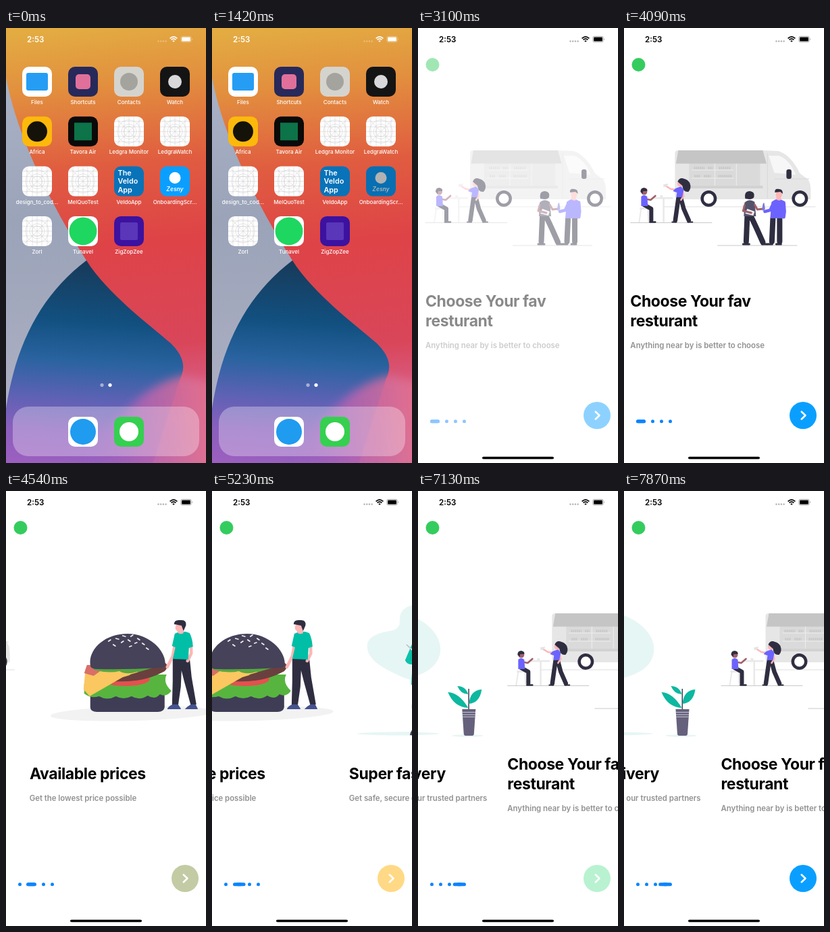
An HTML page for the animation above (7.99 s loop, 296x640 px).

```html
<!DOCTYPE html>
<html lang="en">
<head>
<meta charset="utf-8">
<title>Onboarding</title>
<style>
  html, body { margin: 0; width: 100%; height: 100%; overflow: hidden; background: #fff; }
  svg { display: block; width: 100vw; height: 100vh; font-family: Inter, Roboto, sans-serif; }
  .title { font-size: 23px; font-weight: 700; letter-spacing: -.42px; }
  .sub { font-size: 11.4px; font-weight: 600; letter-spacing: -.02px; fill: #929292; }
  .label { font-size: 8px; font-weight: 500; fill: #fff; text-anchor: middle; }
  .tile { font-weight: 600; fill: #fff; }
  .limb path { fill: none; stroke-linecap: round; stroke-linejoin: round; }
</style>
</head>
<body>
<svg viewBox="0 0 296 640" preserveAspectRatio="none">
  <defs>
    <linearGradient id="warm" gradientUnits="userSpaceOnUse" x1="110" y1="0" x2="170" y2="640">
      <stop offset="0" stop-color="#e3ab42"/><stop offset=".13" stop-color="#e2903e"/>
      <stop offset=".32" stop-color="#e05c40"/><stop offset=".5" stop-color="#de4347"/>
      <stop offset=".74" stop-color="#d9465a"/><stop offset=".87" stop-color="#d8608a"/>
      <stop offset="1" stop-color="#de7ba4"/>
    </linearGradient>
    <linearGradient id="grey" x1="0" y1="0" x2="0" y2="1">
      <stop offset="0" stop-color="#a9b2c6"/><stop offset=".4" stop-color="#9aa3b8"/><stop offset="1" stop-color="#b0b1c4"/>
    </linearGradient>
    <linearGradient id="deep" gradientUnits="userSpaceOnUse" x1="130" y1="343" x2="110" y2="640">
      <stop offset="0" stop-color="#173a59"/><stop offset=".3" stop-color="#125080"/>
      <stop offset=".5" stop-color="#2a63a0"/><stop offset=".68" stop-color="#5c62b4"/>
      <stop offset=".85" stop-color="#8a5fbd"/><stop offset="1" stop-color="#9a5fbf"/>
    </linearGradient>
    <linearGradient id="fan" gradientUnits="userSpaceOnUse" x1="110" y1="580" x2="296" y2="560">
      <stop offset="0" stop-color="#9a60bc" stop-opacity="0"/><stop offset=".5" stop-color="#b463b0" stop-opacity=".85"/>
      <stop offset="1" stop-color="#e0708f" stop-opacity=".9"/>
    </linearGradient>
    <filter id="soft" x="-20%" y="-20%" width="140%" height="140%"><feGaussianBlur stdDeviation="7"/></filter>

    <g id="bar" fill="currentColor">
      <text x="31" y="20.7" font-size="11.6" font-weight="600">2:53</text>
      <g opacity=".3"><circle cx="225.500" cy="19.500" r="1.200"/><circle cx="229.200" cy="19.500" r="1.200"/><circle cx="232.900" cy="19.500" r="1.200"/><circle cx="236.600" cy="19.500" r="1.200"/></g>
      <g fill="none" stroke="currentColor" stroke-width="1.700"><path d="M242.600 15.300Q248 10.600 253.400 15.300M244.500 17.400Q248 14.500 251.500 17.400"/></g>
      <path d="M246.200 19Q248 17.600 249.800 19L248 20.800Z"/>
      <rect x="258.700" y="12.300" width="15.600" height="8.400" rx="2.400" fill="none" stroke="currentColor" stroke-width=".8" opacity=".4"/>
      <rect x="260" y="13.600" width="13" height="5.800" rx="1.200"/>
      <path d="M275.300 15Q277 16.500 275.300 18Z" opacity=".45"/>
    </g>

    <g id="blank">
      <rect width="44" height="44" rx="10" fill="#fff"/>
      <g fill="none" stroke="#c9c9cc" stroke-width=".5">
        <path d="M0 22H44M22 0V44M15 0V44M29 0V44M0 15H44M0 29H44M3 3L41 41M41 3L3 41M7 0V44M37 0V44M0 7H44M0 37H44"/>
        <circle cx="22" cy="22" r="7.500"/><circle cx="22" cy="22" r="11"/><circle cx="22" cy="22" r="17"/>
      </g>
    </g>

    <g id="truck">
      <path d="M60 263H285" stroke="#dedede" stroke-width="1"/>
      <path d="M77 184Q77 180 82 180H207L230 181Q249 187 262 214L273 222Q278 227 278 239V252H83Q77 252 77 246Z" fill="#e6e6e6"/>
      <path d="M216 188L231 188Q246 193 256 216L224 213Z" fill="#f7f7f7"/>
      <path d="M214 184V251M224 222H276" stroke="#d8d8d8" fill="none"/>
      <path d="M98 199H203V232H98Z" fill="#dadada"/>
      <path d="M102 209H164M102 221H164M168 199V232M136 199V232" stroke="#eee" fill="none"/>
      <path d="M105 206H121M126 206H133M142 206H160M106 218H114M120 218H130M141 218H161" stroke="#c9c9c9" stroke-width="4" stroke-dasharray="2 1"/>
      <path d="M94 232H207V236H94Z" fill="#d2d2d2"/>
      <path d="M82 180H207L212.500 199.500H78.500Z" fill="#c5c5c5"/>
      <rect x="242" y="208" width="7.500" height="14" rx="3" fill="#2f2e41"/>
      <g fill="#fff" stroke="#2f2e41" stroke-width="4.500"><circle cx="127" cy="251" r="9.700"/><circle cx="262" cy="251" r="9.700"/></g>
      <path d="M11 286.500H132M140 320H258" stroke="#c9c9c9" stroke-width="1"/>
      <g fill="#e9e9e9"><path d="M46 249H74V251.500H46ZM59 251H61.500V286H59ZM55 246H59V249H55ZM25 264H39V267H25Z"/><path d="M26 266L23 286H25L28 266ZM38 266L39 286H37L36 266Z"/></g>

      <g class="limb">
        <path d="M31 260L42 266L42 283" stroke="#2f2e41" stroke-width="6"/>
        <path d="M40 285.500H48" stroke="#2f2e41" stroke-width="2.500"/>
        <path d="M36 252L41 253L48 247" stroke="#a0616a" stroke-width="2.700"/>
      </g>
      <path d="M27 248Q31 244 36 248L37 262H27Z" fill="#6c63ff"/>
      <circle cx="31.500" cy="241" r="4.500" fill="#a0616a"/>
      <path d="M26 241Q26 235 31.500 235Q37 236 36 240L30 240L29 244Z" fill="#2f2e41"/>

      <g class="limb">
        <path d="M82 251L77.500 283M86 251L90 266L97.500 283" stroke="#2f2e41" stroke-width="6.500"/>
        <path d="M73 285.500H79M96 285.500H103" stroke="#2f2e41" stroke-width="2"/>
        <path d="M80 238L71 237L63 232" stroke="#ffb6b6" stroke-width="2.600"/>
        <path d="M88 239L90 247L86 253" stroke="#ffb6b6" stroke-width="2.500"/>
      </g>
      <path d="M78 236L86 233L90 238L88 249H79L80 242L74 240Z" fill="#6c63ff"/>
      <circle cx="85" cy="229" r="4.500" fill="#ffb6b6"/>
      <path d="M81 226Q84 219 91 222Q96 223 99 228Q102 236 97 241Q89 242 88 232Z" fill="#2f2e41"/>
      <path d="M60 230L67 229L65 233L60 234Z" fill="#e3e3e3"/>

      <g class="limb">
        <path d="M184 278L182.500 314M190 278L198 295L207 315" stroke="#2f2e41" stroke-width="8"/>
        <path d="M178 318H187M206 318H213" stroke="#2f2e41" stroke-width="3"/>
      </g>
      <path d="M180 257Q187 250 195 256L197 277H179Z" fill="#55536b"/>
      <path d="M184 266L195 270L193 276L181 273Z" fill="#f1eff6"/>
      <g class="limb"><path d="M180 261L178 269L190 272M195 260L199 267L208 266" stroke="#a0616a" stroke-width="3"/></g>
      <circle cx="188" cy="246.500" r="5.500" fill="#a0616a"/>
      <path d="M181 251Q179 240 188 240Q196 241 194 249Q191 253 181 251Z" fill="#2f2e41"/>

      <g class="limb">
        <path d="M222 281L220.500 314M232 281L232 314" stroke="#2f2e41" stroke-width="8"/>
        <path d="M214 318H221M227 318H234" stroke="#2f2e41" stroke-width="3"/>
        <path d="M223 257L218 268L210 270" stroke="#6c63ff" stroke-width="4.500"/>
        <path d="M238 257L239 270L238 278" stroke="#6c63ff" stroke-width="5"/>
      </g>
      <path d="M220 256Q229 248 239 255L237 280H218Z" fill="#6c63ff"/>
      <path d="M227 245H234V253Q230 255 227 252Z" fill="#ffb6b6"/>
      <circle cx="231" cy="245" r="4.700" fill="#ffb6b6"/>
      <path d="M225 242Q224 236 231 237Q237 237 236.500 244L233 241Z" fill="#2f2e41"/>
      <path d="M206.500 263Q207 257 209 257Q210 262 210.500 266Q209 270 206 268Z" fill="#7d78dc"/>
    </g>

    <g id="burger">
      <ellipse cx="59" cy="327.500" rx="121" ry="10.500" fill="#f2f2f2" transform="rotate(-1.500 59 327)"/>
      <path d="M-3 290H107V318Q106 325 97 325H7Q-3 325 -3 318Z" fill="#3f3d56"/>
      <path d="M-12 284Q0 268 30 270L110 270Q104 282 117 294Q110 304 100 299Q93 308 82 301Q70 309 58 302Q46 308 35 302Q22 309 10 302Q-2 306 -12 298Z" fill="#57b53f"/>
      <ellipse cx="49" cy="277" rx="36" ry="10" fill="#e5504e"/>
      <path d="M-8 262Q50 252 108 253Q114 258 107 265Q82 279 50 280Q10 282 -7 273Z" fill="#6a403e"/>
      <path d="M-10 262L28 260L79 264L45 274L-4 302L-13 292Z" fill="#fbc760"/>
      <path d="M-8 256H24L2 272L-12 268Z" fill="#d96f67"/>
      <path d="M2 257H108Q104 267 91 265Q79 272 66 266Q51 271 40 265Q25 269 2 263Z" fill="#57a83f"/>
      <path d="M56 270Q84 262 109 254Q113 259 107 265Q82 278 50 280Z" fill="#6a403e"/>
      <path d="M-3 256C-6 233 18 210 52 210C84 210 108 234 108 254Q108 260 100 260Q50 263 8 262Q-3 262 -3 256Z" fill="#454259"/>
      <path d="M24 221L27 219M35 217L39 218M45 213L49 214M57 214L60 212M67 217L70 219M31 226L34 228M43 223L46 221M53 219L56 221M63 224L66 223M74 224L77 226M55 229L58 228M80 231L83 233" stroke="#f3ecec" stroke-width="1.800" stroke-linecap="round"/>
      <path d="M119 245H144L147 274L154 314L146 316L136 280L132 264L131 288L127 316H118L119 280Z" fill="#2f2e41"/>
      <path d="M111 321Q112 317 119 314H127L131 320V321ZM137 321Q140 317 146 314H153L156 320V321Z" fill="#44528f"/>
      <g class="limb"><path d="M123 222L119 243L111 259M146 222L146.500 239L141 250" stroke="#ffb6b6" stroke-width="4.500"/></g>
      <path d="M122 210Q133 204 144 209Q148 216 149 229L143 231L142 248L119 247L123 230L118 228Z" fill="#00bfa6"/>
      <path d="M126 200H135V209Q130 212 126 208Z" fill="#ffb6b6"/>
      <circle cx="128.500" cy="201" r="5.700" fill="#ffb6b6"/>
      <path d="M121 196Q121 189 130 190Q140 189 138.500 198L135 206L132 198Z" fill="#2f2e41"/>
    </g>

    <g id="chef">
      <path d="M86 190C85 172 102 165 121 168C139 170 149 177 163 183C188 192 208 211 208 233C207 258 185 270 158 276C133 284 104 281 84 271C63 261 41 251 38 231C36 212 59 208 76 205Q87 202 86 190Z" fill="#e6f6f4"/>
      <ellipse cx="114.500" cy="357" rx="92" ry="2.700" fill="#e6f6f4"/>
      <ellipse cx="248" cy="360" rx="23" ry="1.700" fill="#e6f6f4"/>
      <path d="M105 283H141L140 318L139 350H130L127 320L122 297L116 320L114 350H106L104 318Z" fill="#6b6782"/>
      <path d="M101 359Q103 351 107 349H114L115 356Q109 361 101 359ZM141 359Q141 353 138 349H130L129 355Q134 361 141 359Z" fill="#3f3d56"/>
      <path d="M106 221Q121 214 138 221Q145 224 150 248Q148 255 141 255L143 284Q122 290 103 285L105 255Q97 256 94 249Z" fill="#0cc2aa"/>
      <g class="limb"><path d="M105 229L102 248L126 247M139 229L143 247L118 241" stroke="#0ab09b" stroke-width="1"/></g>
      <path d="M116 213H127V220Q121 225 116 220Z" fill="#f4a5a5"/>
      <ellipse cx="121" cy="209" rx="7" ry="9" fill="#ffb6b6"/>
      <path d="M113 209L112 200H131L129 208Q125 203 121 203Q116 204 113 209Z" fill="#6a3c49"/>
      <path d="M111 203L111 198Q105 193 109 186Q113 180 119 182Q127 179 131 184Q137 190 132 196L131 203Q121 198 111 203Z" fill="#0cc2aa"/>
      <path d="M96 226L109 236L107 238Z" fill="#fff" stroke="#8b8799" stroke-width=".6"/>
      <path d="M138 234L127 247" stroke="#efeef2" stroke-width="2" stroke-linecap="round"/>
      <ellipse cx="140" cy="231" rx="3" ry="5" fill="#fff" stroke="#cfccd8" stroke-width=".5" transform="rotate(38 140 231)"/>
      <g fill="#ffb6b6"><ellipse cx="113" cy="240" rx="6" ry="4" transform="rotate(25 113 240)"/><ellipse cx="126" cy="247" rx="6.500" ry="3.500" transform="rotate(-12 126 247)"/></g>
      <g fill="#e8fffb"><circle cx="116" cy="230" r=".9"/><circle cx="126" cy="230" r=".9"/><circle cx="116" cy="262" r=".9"/><circle cx="126" cy="262" r=".9"/><circle cx="116" cy="273" r=".9"/><circle cx="126" cy="273" r=".9"/></g>
      <path d="M249.800 291V322" stroke="#3f3d56" stroke-width="1.500"/>
      <g fill="#0cb8a0"><path d="M219 296Q236 297 249 319Q228 318 219 296Z"/><path d="M269 292Q252 293 250 313Q266 312 269 292Z"/><path d="M233 287Q245 287 249 299Q238 299 233 287Z"/></g>
      <path d="M240 321H260L257.500 358Q257 360 255 360H245Q243 360 242.500 358Z" fill="#65617c"/>
      <path d="M240.300 325.500H259.700M240.600 329H259.400M240.900 332.300H259.100" stroke="#c9c7d4" stroke-width="1"/>
    </g>

    <g id="intro">
      <use href="#truck"/>
      <g class="title"><text x="11" y="410">Choose Your fav</text><text x="11" y="438.500">resturant</text></g>
      <text class="sub" x="11" y="470.500">Anything near by is better to choose</text>
    </g>
  </defs>

  <g id="home">
    <g id="desk">
      <rect x="-30" y="-30" width="356" height="700" fill="url(#warm)"/>
      <path d="M-30 72H0C14 150 60 250 119 342L122 420L0 600H-30Z" fill="url(#grey)"/>
      <path d="M119 342C150 391 214 438 244 464Q271 490 258 515L208 670H-30V560H0C15 462 54 391 119 342Z" fill="url(#deep)"/>
      <path d="M262 512C225 520 160 550 90 690H340V530Z" fill="url(#fan)" filter="url(#soft)"/>
      <g id="icons">
        <rect x="10" y="557" width="276" height="73" rx="23" fill="#fff" opacity=".3"/>
        <circle cx="142" cy="525.300" r="2.600" fill="#fff" opacity=".5"/><circle cx="154" cy="525.300" r="2.600" fill="#fff"/>
      </g>
    </g>
    <rect id="dim" width="296" height="640" opacity="0"/>
    <use id="homeBar" href="#bar" color="#fff"/>
  </g>

  <clipPath id="frame"><rect id="hole"/></clipPath>
  <g id="app" clip-path="url(#frame)">
    <rect width="296" height="640" fill="#fff"/>
    <rect id="splash" width="296" height="640" fill="#0a9fff"/>
    <use id="appBar" href="#bar" color="#000"/>
    <g id="content">
      <circle cx="21.500" cy="54" r="10" fill="#35cc5e"/>
      <g id="pages">
        <use href="#intro"/>
        <g transform="translate(296)">
          <use href="#burger" x="104"/>
          <text class="title" x="183" y="424.300" text-anchor="end">Available prices</text>
          <text class="sub" x="11" y="456.300">Get the lowest price possible</text>
        </g>
        <g transform="translate(592)">
          <use href="#chef"/>
          <text class="title" x="11" y="424.300">Super fast delivery</text>
          <text class="sub" x="11" y="456.300">Get safe, secure delivery by our trusted partners</text>
        </g>
        <use href="#intro" x="888"/>
      </g>
      <g id="dots" fill="#0a84ff"></g>
      <circle id="next" cx="265" cy="570" r="20"/>
      <path d="M262.700 564.500L268.500 570L262.700 575.500" fill="none" stroke="#fff" stroke-width="2.500" stroke-linecap="round" stroke-linejoin="round"/>
    </g>
    <rect id="grip" x="95" y="630.700" width="106" height="3.600" rx="1.800"/>
  </g>
</svg>
<script>
const LOOP = 7990, W = 296, H = 640;
const TICKS = [0, 1420, 1640, 1770, 1890, 2000, 2110, 2250, 3100, 3210, 3330,
  4090, 4210, 4320, 4430, 4540, 4650, 5010, 5120, 5230, 5340, 5450, 5560, 5670,
  6670, 6810, 6920, 7030, 7140, 7240, 7760, 7870];
const SWIPES = [[4065, 575, 1], [4974, 640, 1], [6775, 455, 1], [7684, 400, -1]];
const BLUE = [10, 159, 255], YELLOW = [255, 217, 133], GREEN = [207, 252, 203];
const COLORS = [BLUE, YELLOW, GREEN, BLUE];

const $ = id => document.getElementById(id);
const set = (el, attrs) => { for (const k in attrs) el.setAttribute(k, attrs[k]); return el; };
const add = (parent, tag, attrs) =>
  parent.appendChild(set(document.createElementNS('http://www.w3.org/2000/svg', tag), attrs));
const clamp = x => Math.min(1, Math.max(0, x));
const lerp = (a, b, u) => a + (b - a) * u;
const smooth = x => (x = clamp(x)) * x * (3 - 2 * x);

const disc = (fill, r) => `<circle cx="22" cy="22" r="${r}" fill="${fill}"/>`;
const lines = (words, size) => words.map((w, i) =>
  `<text class="tile" x="5.500" y="${13 + i * 12.500}" font-size="${size}">${w}</text>`).join('');

// label, tile colour (none: blank template), inner drawing
const APPS = [
  ['Files', '#fff', '<rect x="6" y="9" width="32" height="26" rx="3" fill="#259df4"/>'],
  ['Shortcuts', '#27295a', '<rect x="11" y="11" width="22" height="22" rx="5" fill="#e0709a"/>'],
  ['Contacts', '#d5d3ce', disc('#a5a39e', 13)],
  ['Watch', '#141415', disc('#d8d8da', 10)],
  ['Africa', '#fdb90b', disc('#15120a', 15)],
  ['Tavora Air', '#0a0a0a', '<rect x="9" y="9" width="26" height="26" fill="#0d7348"/>'],
  ['Ledgra Monitor'], ['LedgraWatch'], ['design_to_cod...'], ['MelQuoTest'],
  ['VeldoApp', '#0873b9', lines(['The', 'Veldo', 'App'], 10.8)],
  ['OnboardingScr...', '#0a9fff', disc('#fff', 8.500).replace('cy="22"', 'cy="17"') +
    '<text class="tile" x="22" y="36.500" font-size="8.500" font-style="italic" text-anchor="middle">Zesny</text>'],
  ['Zorl'],
  ['Tunavel', '#fff', disc('#1ed760', 20.500)],
  ['ZigZopZee', '#3c12a0', '<rect x="9" y="9" width="26" height="26" rx="2" fill="#5a36b8"/>'],
];

function tile(x, y, color, art) {
  const g = add($('icons'), 'g', { transform: `translate(${x} ${y})` });
  if (color) {
    add(g, 'rect', { width: 44, height: 44, rx: 10, fill: color });
    g.insertAdjacentHTML('beforeend', art);
  } else add(g, 'use', { href: '#blank' });
  return g;
}

const tiles = APPS.map(([name, color, art], i) => {
  const x = 24 + 68 * (i % 4), y = 57 + 73.3 * (i >> 2);
  add($('icons'), 'text', { class: 'label', x: x + 22, y: y + 55 }).textContent = name;
  return tile(x, y, color, art);
});
tile(92, 572, '#fff', disc('#1f9bf0', 19));
tile(160, 572, '#35d04f', disc('#fff', 14));

const launcher = tiles[11];
const shade = add(launcher, 'rect', { width: 44, height: 44, rx: 10, opacity: 0 });
const dots = Array.from({ length: 5 }, () => add($('dots'), 'rect', { y: 576.3, height: 5, rx: 2.5 }));

function drawLaunch(t) {
  const open = t >= 1640, full = t >= 2250;
  const s = full ? 1 : clamp((t - 1590) / 660);
  const ease = n => 1 - (1 - s) ** n;
  const p = ease(5.65);
  const left = lerp(228, 0, p), right = lerp(272, W, p);
  const top = lerp(203, 0, ease(4.21)), bottom = lerp(248, H, ease(4.84));

  $('home').style.display = full ? 'none' : '';
  $('app').style.display = open ? '' : 'none';
  set(shade, { opacity: t >= 1420 && !open ? .3 : 0 });
  launcher.style.display = open ? 'none' : '';
  $('desk').style.filter = open && !full ? `blur(${6.5 * p}px)` : 'none';
  set($('icons'), { transform: `translate(148 320) scale(${1 - .06 * p}) translate(-148 -320)` });
  set($('dim'), { opacity: .36 * p });
  set($('homeBar'), { opacity: 1 - .6 * p });

  set($('hole'), { x: left, y: top, width: right - left, height: bottom - top, rx: full ? 0 : lerp(10, 48, p) });
  set($('splash'), { opacity: clamp(1 - s / .15) });
  set($('appBar'), { transform: `translate(${left} ${top}) scale(${(right - left) / W})` });
  set($('grip'), { opacity: full ? 1 : 0 });
}

function drawPages(t) {
  set($('content'), { opacity: clamp((t - 2975) / 270) });
  let pos = 0, color = COLORS[0];
  SWIPES.forEach(([start, time, dir], i) => {
    pos += dir * smooth((t - start) / time);
    const u = clamp((t - start - time / 2) / 250);
    if (dir > 0) color = color.map((c, k) => lerp(c, COLORS[i + 1][k], u));
  });
  set($('pages'), { transform: `translate(${-W * pos})` });
  set($('next'), { fill: `rgb(${color.map(Math.round)})` });

  const current = Math.round(pos);
  let x = 18;
  for (let i = 0; i < 4; i++) {
    const width = i === current ? 14 : 5;
    set(dots[i], { x, width });
    x += width + 8;
  }
  set(dots[4], { x: 18 + 13 * pos, width: 14 });
}

function render() {
  const now = performance.now() % LOOP;
  const t = TICKS.filter(k => k <= now).pop();
  drawLaunch(t);
  drawPages(t);
  requestAnimationFrame(render);
}
render();
</script>
</body>
</html>
```
